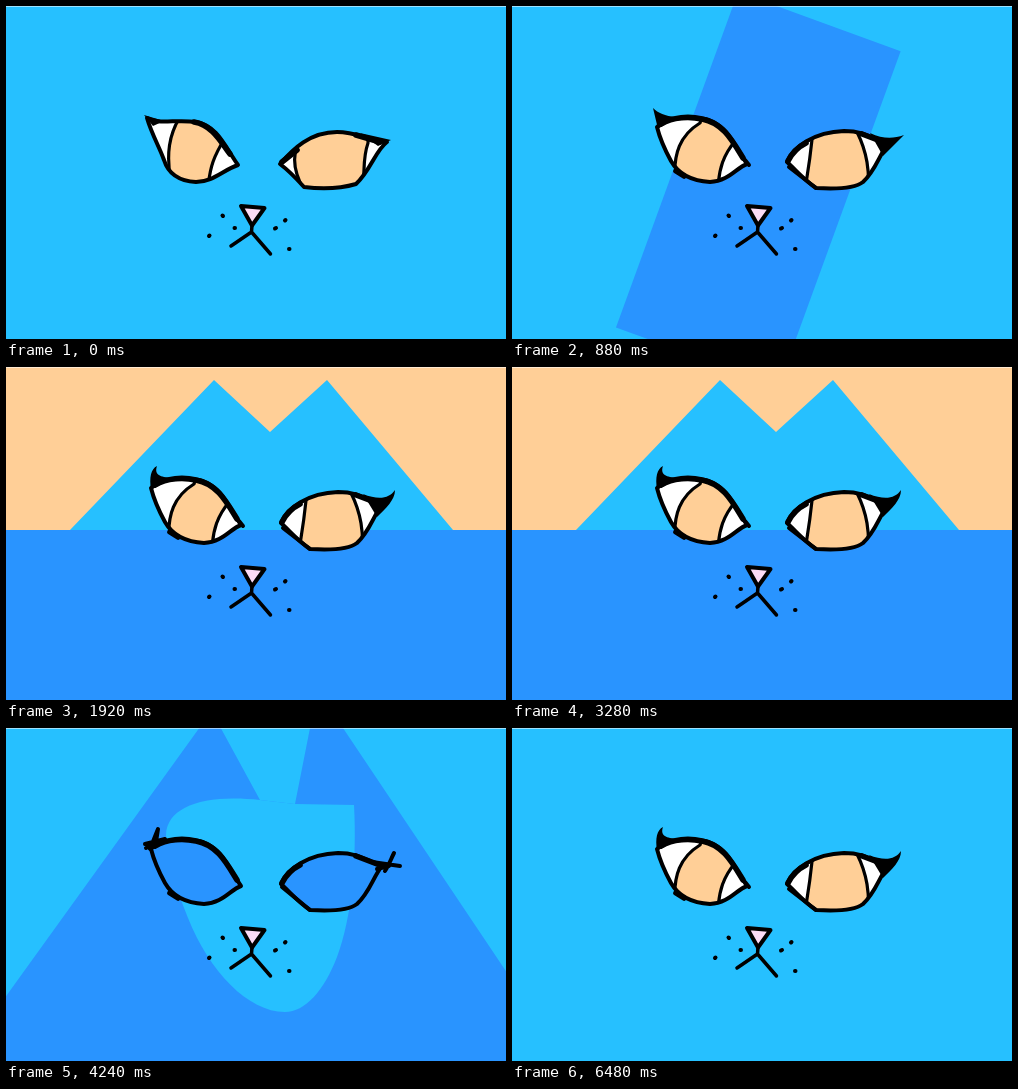
An HTML page for the animation above (6560 ms loop, 500 by 333 pixels).

```html
<!DOCTYPE html>
<html lang="en">
<head>
<meta charset="utf-8">
<title>Cat eyes</title>
<style>
  html, body { margin: 0; width: 100%; height: 100%; overflow: hidden; background: #26c0ff; }
  svg { display: block; width: 100%; height: 100%; }
  .ink { fill: none; stroke: #000; stroke-width: 4; stroke-linecap: round; stroke-linejoin: round; }
  .thin { stroke-width: 3.2; }
  .heavy { stroke-width: 5.6; }
  .cyan { fill: #26c0ff; }
  .blue { fill: #2994ff; }
  .peach { fill: #ffcf97; }
</style>
</head>
<body>
<svg viewBox="0 0 500 333">
  <defs>
    <clipPath id="clipL"><path id="shapeL"/></clipPath>
    <clipPath id="clipR"><path id="shapeR"/></clipPath>
  </defs>
  <rect class="cyan" width="500" height="333"/>
  <g id="land">
    <rect class="peach" width="500" height="163"/>
    <path id="peaks" class="cyan" d="M208 13L264 65L321 13L447 163H64Z"/>
  </g>
  <rect id="slab" class="blue"/>
  <g id="cat">
    <path class="blue" d="M205.5 -17L254 72L289 76L311.5 -38L701 543H-198Z"/>
    <path class="cyan" d="M254 72L289 76L348 77C351 130 346 190 331 229C318 263 299 284 279 284C242 284 203 243 182 190C169 157 160 130 160 107C161 78 199 66 254 72Z"/>
  </g>
  <rect width="500" height="1" fill="#fff" opacity=".55"/>
  <g id="eyes"></g>
  <path class="ink" d="M246 219L245.5 226L225 240M245.5 226L264.500 248" style="stroke-width:3.5"/>
  <path class="ink" d="M235 200L258.500 202L246 219.500Z" style="fill:#fcdcf6"/>
  <path class="ink" d="M216.500 209.500l.5.5M203 230l.5-.5M228.500 222h.5M269 222.500l1-.5M279 214.500l.5-.5M283 243h.5"/>
</svg>
<script>
const LOOP = 6560, STEP = 80;
const $ = id => document.getElementById(id);
const clamp = x => Math.max(0, Math.min(1, x));
const ease = x => x * x * (3 - 2 * x);
const phase = (t, from, to) => ease(clamp((t - from) / (to - from)));
const mix = (a, b, p) => a + (b - a) * p;

// Eye outlines: wide stare, default, squeezed shut
const shapes = {
  wide: {
    L: 'M141 112C152 119 170 113 190 116C212 120 219 141 232 159C217 164 207 176 190 176C172 175 162 167 158 154C153 140 146 129 141 112Z',
    R: 'M274 158C287 143 304 126 331 126C351 126 361 134 381 136C369 145 365 164 350 178C333 183 314 183 298 181C289 171 282 164 274 158Z',
    heavy: 'M188 116C207 119 216 138 224 148M276 156L291 144M350 129L374 136'
  },
  calm: {
    L: 'M145 121C153 112 171 111 187 112C215 115 221 138 235 158C224 162 217 175 198 176C180 175 167 169 159 155C153 144 148 133 145 121Z',
    R: 'M275 156C281 141 302 126 332 125C353 125 361 133 376 138C367 149 364 164 351 176C342 183 320 183 304 182C291 173 284 164 275 156Z',
    heavy: 'M149 118C161 111 177 110 190 113C211 117 220 134 231 152M164 165L172 170M276 155C280 147 286 141 294 137M350 128L371 136'
  },
  shut: {
    L: 'M143 118C155 113 172 111 187 113C212 118 222 143 231 160C219 165 207 173 192 173C171 172 160 163 153 145C149 136 145 127 143 118Z',
    R: 'M274 157C285 141 305 126 335 124C352 124 361 133 375 136C368 149 361 168 348 178C334 183 316 183 303 180C291 172 283 164 274 157Z',
    heavy: 'M146 119C155 147 163 168 188 173M190 114C207 119 217 133 225 147M276 156L290 143M345 126L372 136'
  }
};

// White corners flank each iris
const irises = {
  wide: {
    L: 'M176 108C163 127 159 148 166 182H202C204 160 208 150 219 132V105Z',
    R: 'M297 124C287 146 284 160 299 186H354C361 172 355 157 362 137V115Z'
  },
  calm: {
    L: 'M192 105L188 117C170 128 159 146 164 182H206C207 163 211 149 224 134V105Z',
    R: 'M302 115C300 137 298 155 292 190H356C358 165 355 146 345 126V115Z'
  }
};

// Lower edges of the half closed lids
const halfLids = {
  L: 'M162 100C155 120 160 135 163 146C181 145 197 150 210 157L232 152V95H158Z',
  R: 'M265 157C287 161 310 169 339 160L357 153L369 145V105H265Z'
};

const tails = 'M233 154L237 159M277 161L304 182';
const lashes = {
  wide: { fill: 'M138 109L158 115L147 120ZM354 127L385 134L372 140Z', line: '' },
  wedge: { fill: 'M141 102C146 107 153 110 164 111L146 123ZM358 127C371 133 381 133 392 129L371 150Z', line: tails },
  curl: { fill: 'M151 99C148 108 154 110 166 111L145 123C143 110 145 102 151 99ZM357 127C372 133 383 132 389 123C389 133 380 141 371 150Z', line: tails },
  hairs: { fill: '', line: 'M148 118C142 110 145 104 149 103M136 117L151 119M371 136C378 136 382 132 386 127M372 141L385 140M280 163L304 184' },
  cross: { fill: '', line: 'M144 121L152 101L150 114M139 116L159 111M140 120L149 116M366 134L394 138M379 143C383 137 385 131 388 125M371 141L383 138M276 159L304 182' }
};

// [start, value] cues, each held until the next
const lidCues = [[0, 0], [1120, .5], [1280, 1], [1440, .5], [1680, 0], [3360, .5], [3440, 1],
  [4400, .5], [4480, 0], [6240, 1], [6320, 0]];
const lashCues = [[0, 'wide'], [240, 'wedge'], [1280, 'curl'], [3520, 'hairs'], [3920, 'cross'], [4400, 'curl']];
const cue = (list, t) => list.filter(c => c[0] <= t).pop()[1];

function eye(side, shape, iris, lid) {
  const d = shape[side];
  $('shape' + side).setAttribute('d', d);
  const cover = lid === 1 ? `<path class="blue" d="${d}"/>`
    : lid ? `<path class="ink" style="fill:#2994ff" d="${halfLids[side]}"/>` : '';
  return `<g clip-path="url(#clip${side})"><path fill="#fff" d="${d}"/>` +
    `<path class="ink thin" style="fill:#ffcf97" d="${iris[side]}"/>${cover}</g>` +
    `<path class="ink" d="${d}"/>`;
}

let drawnEyes = '';
function drawEyes(t) {
  const lid = cue(lidCues, t), style = cue(lashCues, t);
  const key = lid + style;
  if (key === drawnEyes) return;
  drawnEyes = key;
  const shape = style === 'wide' ? shapes.wide : style === 'hairs' ? shapes.shut : shapes.calm;
  const iris = style === 'wide' ? irises.wide : irises.calm;
  const lash = lashes[style];
  $('eyes').innerHTML = eye('L', shape, iris, lid) + eye('R', shape, iris, lid) +
    `<path class="ink heavy" d="${shape.heavy}"/>` +
    `<path d="${lash.fill}"/><path class="ink" d="${lash.line}"/>`;
}

const show = (id, on) => $(id).setAttribute('visibility', on ? 'visible' : 'hidden');
const zoom = (id, x, y, s, dy = 0) =>
  $(id).setAttribute('transform', `translate(${x} ${y + dy}) scale(${s}) translate(${-x} ${-y})`);

function drawSlab(t) {
  show('slab', t >= 80 && t < 3520);
  const grow = phase(t, 0, 640), turn = phase(t, 880, 1200), drop = phase(t, 3280, 3520);
  const w = 173 * grow, h = mix(357, 520, turn) * grow;
  const x = mix(246.3, 250, turn), y = mix(183.3, 249.5, turn) + 175 * drop;
  const slab = $('slab');
  slab.setAttribute('width', w);
  slab.setAttribute('height', h);
  slab.setAttribute('transform', `translate(${x} ${y}) rotate(${mix(20, 90, turn)}) translate(${-w / 2} ${-h / 2})`);
}

function drawLand(t) {
  show('land', t > 880 && t < 3520);
  const away = t < 2000 ? 1 - phase(t, 880, 1200) : phase(t, 3280, 3520);
  zoom('peaks', 264, 163, 1 + 5 * away);
}

function drawCat(t) {
  show('cat', t > 3600 && t < 4480);
  const p = clamp((t - 4000) / 480);
  zoom('cat', 255, 160, .7 * Math.exp(2.853 * p ** 3), 333 * (1 - phase(t, 3600, 3840)));
}

function render(t) {
  drawLand(t);
  drawSlab(t);
  drawCat(t);
  drawEyes(t);
}

function tick() {
  render(Math.floor(performance.now() % LOOP / STEP) * STEP);
  requestAnimationFrame(tick);
}
tick();
</script>
</body>
</html>
```
